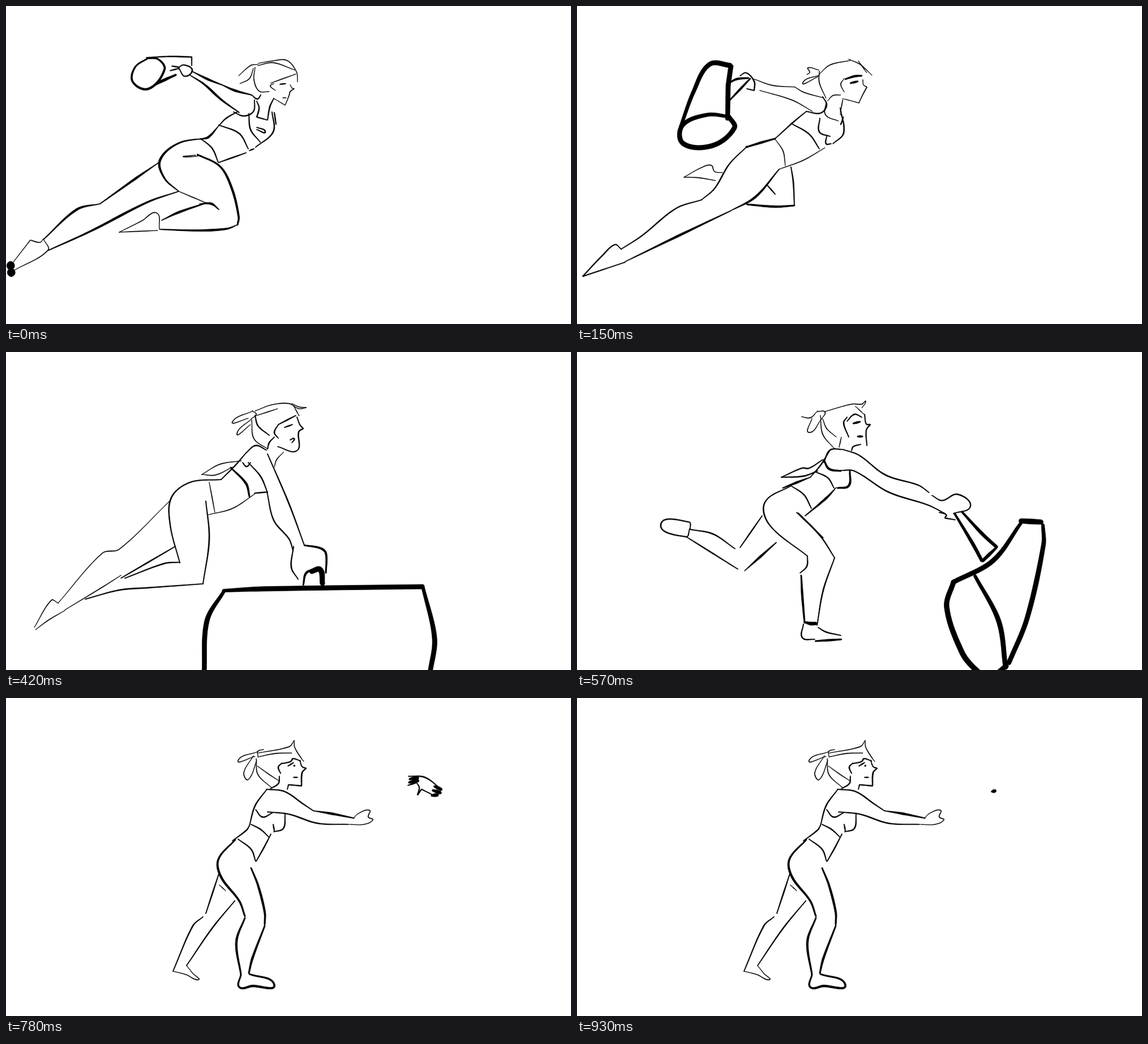
Write an HTML page that moves like this. It is 998x561 px and loops after 0.96 s.

```html
<!DOCTYPE html>
<html lang="en">
<head>
<meta charset="utf-8">
<title>Throw</title>
<style>
html, body { margin: 0; width: 100%; height: 100%; overflow: hidden; background: #fff; }
svg { display: block; width: 998px; height: 561px; }
path { fill: none; stroke: #000; stroke-width: 2; stroke-linejoin: round; stroke-linecap: round; }
path.ink { fill: #000; stroke-width: .7; }
g[id] { visibility: hidden; animation: 960ms step-end infinite; }
#lunge { animation-name: lunge; }
#windup { animation-name: windup; }
#swing { animation-name: swing; }
#plant { animation-name: plant; }
#release { animation-name: release; }
#follow { animation-name: follow; }
#mug { animation-name: mug; transform-origin: 305px 129px; }
#flung { animation-name: flung; transform-origin: 740px 430px; }
#burst { animation-name: burst; transform-origin: 736px 164px; }
#speck { animation-name: speck; }
@keyframes lunge { 0% { visibility: visible; } 12.5%, 100% { visibility: hidden; } }
@keyframes windup { 12.5% { visibility: visible; } 28.125%, 100% { visibility: hidden; } }
@keyframes swing { 28.125% { visibility: visible; } 43.75%, 100% { visibility: hidden; } }
@keyframes plant { 43.75% { visibility: visible; } 59.375%, 100% { visibility: hidden; } }
@keyframes release { 59.375% { visibility: visible; } 68.75%, 100% { visibility: hidden; } }
@keyframes follow { 68.75%, 100% { visibility: visible; } }
@keyframes mug {
  12.5% { visibility: visible; transform: rotate(26deg) scale(.85); }
  15.625% { visibility: visible; transform: none; }
  28.125%, 100% { visibility: hidden; }
}
@keyframes flung {
  59.375% { visibility: visible; transform: none; }
  68.75% { visibility: visible; transform: translateY(-130px) scale(.7); }
  78.125% { visibility: visible; transform: translateY(-255px) scale(.4); }
  81.25%, 100% { visibility: hidden; }
}
@keyframes burst {
  81.25% { visibility: visible; transform: none; }
  84.375% { visibility: visible; transform: scale(.8); }
  87.5% { visibility: visible; transform: scale(.6); }
  90.625% { visibility: visible; transform: scale(.45); }
  93.75% { visibility: visible; transform: scale(.3); }
  96.875%, 100% { visibility: hidden; }
}
@keyframes speck { 96.875%, 100% { visibility: visible; } }
</style>
</head>
<body>
<svg viewBox="0 0 998 561">
<g id="lunge">
  <path class="thin" d="M446 101 470 97 496 96 513 116 515 134M445 105 472 100 510 113M440 108 438 130 447 150 465 151M445 103 432 105 411 123M437 110 430 128 413 137"/>
  <path class="thin" d="M468 136 487 129 512 120M473 137 467 141 476 149M502 139L505 145L509 146 502 151 500 158L493 175 473 163M489 162 495 162"/>
  <path class="pen" d="M484 138 494 137M304 109 314 104 329 113 316 124 306 111M434 157 444 164 450 157M439 166 437 186 420 194 402 187"/>
  <path class="swell" d="M328 115 356 129 381 139M379 138 404 149 434 157M325 122 350 138 380 165 412 188"/>
  <path class="pen" d="M410 186 389 198 376 211M376 210 412 225 428 252M430 255 438 252M443 168 447 180L443 196L461 201M473 163 466 178 462 201"/>
  <path class="pen" d="M429 190 432 218 449 240M470 187 472 222 441 249M474 188 477 209M443 214 458 222L443 218M376 276 424 259M344 234 364 251 375 276"/>
  <path class="swell" d="M376 211 358 231 344 235M356 233 305 242 272 272 280 304 305 327M342 349 363 349 376 359M275 378 305 364 355 347"/>
  <path class="bold" d="M338 262 378 283 399 322 411 372 409 386"/>
  <path class="swell" d="M409 386 390 393 340 396 271 394M270 276 228 305 166 349M166 349 125 359 66 412M305 327 250 346 150 397 75 431"/>
  <path class="thin" d="M305 327 355 348M345 264 314 266 335 263M200 399 240 379 266 365 271 393M200 399 268 396M271 276 270 286"/>
  <path class="thin" d="M66 411 60 417L43 413 12 453M66 411 74 431 15 466"/>
  <path class="dot" d="M8 458 8.5 458M9 470 9.5 470"/>
  <path class="bold" d="M251 92 228 108 224 134 252 146 280 112 269 94 251 92"/>
  <path class="pen" d="M248 91 290 89L328 90L328 105M293 106 306 108M290 114 306 110"/>
  <path class="bold" d="M264 139 300 121M271 133 300 122"/>
</g>

<g id="windup">
  <path class="thin" d="M428 120 447 104 483 96M480 94 500 103 521 122M497 97 512 118M428 115 428 135 440 163M443 167 452 158 466 157M427 113 408 109 411 117 406 121M428 122 399 135 427 124"/>
  <path class="thin" d="M472 128 466 138 472 152M505 130 506 139L512 143 503 160L498 171 472 164"/>
  <path class="bold" d="M474 129 490 124 503 123M483 136 496 133"/>
  <path class="thin" d="M313 129 345 140 385 143M385 143 400 152 435 162M323 149 380 166 416 186"/>
  <path class="pen" d="M288 123 299 118 313 133L313 149 300 146M434 160 441 175 430 189 405 186"/>
  <path class="pen" d="M405 186 382 205 350 234M378 207 410 226 428 252M429 198 428 222 447 230M441 230 440 243 449 243M465 180 471 224 452 243"/>
  <path class="thin" d="M440 170 439 192 462 203M470 163 465 188M465 190 469 198 466 209 471 195M350 235 364 256 368 282M357 288 400 272 438 250"/>
  <path class="bold" d="M350 234 325 241 299 249M299 249 300 248"/>
  <path class="pen" d="M299 249 269 279 243 322 220 342M220 342 175 357 115 405 78 429M78 429 67 421 45 440L10 477L85 452"/>
  <path class="swell" d="M85 451 180 405 270 362M270 362 315 337 357 288"/>
  <path class="pen" d="M378 284 382 310 384 352M336 316 350 332"/>
  <path class="bold" d="M384 352 350 354 300 350"/>
  <path class="thin" d="M189 302 220 285 237 281 243 292 257 294M189 302 215 303 245 308"/>
</g>
<g id="mug">
  <path class="thick" d="M183 213 206 151 234 103L272 105L267 140 266 198M268 195 230 192 186 211 188 243 240 246 278 215 268 195"/>
  <path class="bold" d="M270 135 282 129 303 127M270 166 306 128"/>
</g>

<g id="swing">
  <path class="thin" d="M438 104 480 94 508 102 518 96M440 108 465 105 488 107M496 97 510 119M434 110 429 140 443 165M443 165 463 153 466 142M432 118 450 155M438 103 418 106 400 115M428 112 398 138 425 120M430 105 438 108 431 111"/>
  <path class="pen" d="M473 126 466 126 467 140 470 134M473 130 490 122 498 113M506 118 504 128L515 133 508 142L501 173 470 164M484 130 496 124M493 155 500 156"/>
  <path class="pen" d="M363 235 384 213 410 172 436 163M385 247 420 205 438 180 434 165M343 243 360 238 383 256 375 280"/>
  <path class="bold" d="M357 239 340 251 343 268"/>
  <path class="pen" d="M384 206 378 210 384 215M383 248 398 277M375 281 405 272 440 255M425 224 440 240 439 257M432 218 440 228M445 245 472 232 470 203"/>
  <path class="thin" d="M443 197 468 204M443 170 453 198M413 220 430 225M474 165 468 200"/>
  <path class="pen" d="M363 235 315 240 275 270M385 283 404 312 405 375M340 317 370 350M355 339 375 353M209 378 195 398L170 405 107 472M218 430 183 449 124 485"/>
  <path class="taper" d="M272 264 245 274 214 292L211 340 222 415 250 488"/>
  <path class="bold" d="M270 263 305 313 375 373M250 488 275 430 320 391 370 377"/>
  <path class="heavy" d="M365 376 400 378 410 410 375 465 315 510 262 510 250 488"/>
  <path class="bold" d="M303 311 330 283 357 260 363 262 344 293 330 334"/>
</g>

<g id="plant">
  <path class="thin" d="M440 104 470 93 500 91 517 100 531 98M505 91 518 97 530 98M508 95 518 113M443 112 480 100M434 120 438 153 462 171M436 104 400 123 428 117M434 118 408 144 432 128M435 104 442 110 433 118"/>
  <path class="pen" d="M462 171 465 160 474 150M440 112 445 130 465 147M481 128 474 142 481 152M481 128 512 112M514 115 519 128L525 135 517 141 514 174L480 167M492 133 506 128M502 155 509 153 505 160"/>
  <path class="pen" d="M461 247 473 297 500 330 507 350M462 180 500 268 527 341M508 343 504 380 516 401M424 178 441 165 460 173M418 195 425 202 432 195"/>
  <path class="bold" d="M527 341 555 346 565 355 565 390M397 204 424 232 430 255"/>
  <path class="thin" d="M346 216 378 198 416 192M346 216 370 217 400 203M490 177 478 190 474 203M359 230 369 283M358 287 400 276 440 250"/>
  <path class="pen" d="M428 195 450 220 462 248M439 249 462 247M424 178 405 200 380 225"/>
  <path class="pen" d="M380 225 325 230 292 257 290 305 307 372M353 263 359 330 348 409M348 409 250 416 200 420 140 436M299 343 203 399M307 371 280 373 210 399"/>
  <path class="thin" d="M288 264 200 348 170 355 92 443M203 394 170 415 104 455M92 443 80 438 50 486M104 456 75 473 52 490"/>
  <path class="thick" d="M384 421 450 418 735 414M385 422 355 474 350 566M736 413 757 505 749 566"/>
  <path class="fat" d="M540 387 555 384L559 408"/>
  <path class="bold" d="M525 411 531 389 551 384"/>
</g>

<g id="release">
  <path class="thin" d="M438 105 485 92 503 92 510 87 503 99M492 96 507 110M430 112 434 145 455 171M463 168 467 150M434 118 441 135 458 150M425 104 412 116 396 114M415 117 410 142 432 118M425 105 438 106 432 118"/>
  <path class="pen" d="M477 115 471 125 480 150M477 122 490 110 503 115M508 110 511 127L518 128 511 138L512 165M501 163 488 167 485 174"/>
  <path class="bold" d="M488 126 500 123M496 149 504 149M436 190 445 206 466 210M482 210 480 236 460 240"/>
  <path class="pen" d="M470 172 498 182 545 217 603 235 622 248M465 209 490 210 550 247 620 270 650 285M627 253 645 262 672 251 695 272 665 285M640 283 652 287L650 293L668 296"/>
  <path class="pen" d="M436 195 447 173 470 172M361 221 397 205 410 205 434 190M361 221 400 219 425 210M447 173 430 200 412 221M420 211 443 222 454 240M378 236 401 252 414 276"/>
  <path class="swell" d="M412 221 363 240M458 239 440 258 403 289M296 386 352 336"/>
  <path class="pen" d="M378 236 332 265 340 305 407 360M388 283 430 325 455 363M391 284 435 328M455 363 435 420 424 482M407 360 406 378 394 390"/>
  <path class="bold" d="M396 394 398 430 402 478M421 510 467 507"/>
  <path class="heavy" d="M404 477 412 479 422 479"/>
  <path class="pen" d="M400 480 398 504L420 507M426 486 440 494 466 500M327 289 288 345M279 347 240 321 200 313M284 383 225 346 193 326M200 313 198 300 148 304 193 326 199 312"/>
</g>
<g id="flung">
  <path class="fat" d="M784 298 820 300M665 406 653 450 680 530 705 561 728 574 758 554"/>
  <path class="thick" d="M823 305 824 340 795 470 763 548M784 302 735 368 665 406M703 395 745 475 757 556"/>
  <path class="heavy" d="M667 285 700 340 715 368M680 282 715 320 741 344M741 345 717 368"/>
</g>

<g id="follow">
  <path class="thin" d="M446 97 500 86 509 75M509 75 510 87 522 107 526 112M445 104 475 98 505 97M442 107 445 135 470 159M444 120 465 135 482 146M444 95 410 110 440 103M437 102 420 132 428 144 443 110M455 91 445 94 445 103"/>
  <path class="pen" d="M486 116 503 112 507 107 520 111M487 115 481 122 485 133M483 138 481 151 467 160M519 110 523 121L530 124 523 132L522 155L499 153L497 161M498 120 508 114M508 140 515 140"/>
  <path class="bold" d="M509 119 509.5 120"/>
  <path class="pen" d="M460 161 492 165 525 187 543 199M462 201 500 205 550 221 605 223M460 162 440 190 430 225M441 197 453 210 470 203"/>
  <path class="swell" d="M543 199 575 204 615 212"/>
  <path class="thin" d="M614 212 622 204 642 198 640 210 648 215 632 223 607 223"/>
  <path class="pen" d="M493 205 490 230 473 236M472 223 474 235M433 223 450 232 464 245M468 240 455 265 442 288M430 225 425 233 400 252M410 249 433 267 441 288"/>
  <path class="bold" d="M405 250 375 285 380 316 412 358 422 385M422 388 407 430 415 488M433 300 445 330 457 378 457 400M457 402 435 460 429 485"/>
  <path class="bold" d="M415 488 412 510L435 508 474 506L430 487"/>
  <path class="pen" d="M376 310 353 380M348 386 330 402 295 482M404 358 365 405 319 472"/>
  <path class="thin" d="M295 482 318 488 340 497L330 486 319 472M377 330 388 340"/>
</g>
<g id="burst">
  <path class="pen" d="M711 138 740 140 770 162M710 154 724 150M725 149 730 158L727 171L734 161L752 170"/>
  <path class="heavy" d="M713 143 727 141M712 149 727 146M757 156 768 161M754 163 767 167M752 172 762 171"/>
</g>
<g id="speck"><path class="heavy" d="M733 165 738 164"/></g>
</svg>
<script>
// Pen widths along a stroke, from start to end.
const pens = {
  thin: [1.2, 1.9, 1.2], pen: [1.9, 2.7, 1.9], swell: [1.6, 4.5, 2], bold: [2.8, 4.4, 3],
  heavy: [4, 6.5, 6], taper: [8, 9, 7, 3], thick: [6, 9, 8.5], fat: [9, 10, 9], dot: [16, 16]
};

function unit(a, b) {
  const d = Math.hypot(b.x - a.x, b.y - a.y) || 1;
  return { x: (b.x - a.x) / d, y: (b.y - a.y) / d };
}

function widthAt(w, t) {
  const s = t * (w.length - 1), i = Math.min(Math.floor(s), w.length - 2);
  return w[i] + (w[i + 1] - w[i]) * (s - i);
}

// An explicit L marks a sharp corner; the other points are joined smoothly.
function parse(text) {
  return [...text.matchAll(/(L?)\s*([\d.]+) ([\d.]+)/g)]
    .map(([, l, x, y]) => ({ x: +x, y: +y, sharp: l === "L" }));
}

// Outline of a smooth stroke with changing width.
function outline(text, widths) {
  const pts = parse(text), last = pts.length - 1, left = [], right = [], N = 10;
  const heading = (i, a, b) =>
    i === 0 || i === last || pts[i].sharp ? unit(a, b) : unit(pts[i - 1], pts[i + 1]);
  for (let i = 0; i < last; i++) {
    const a = pts[i], b = pts[i + 1], reach = Math.hypot(b.x - a.x, b.y - a.y);
    const u = heading(i, a, b), v = heading(i + 1, a, b);
    for (let n = 0; n <= N; n++) {
      const t = n / N, r = 1 - t;
      const at = k => r * r * (1 + 2 * t) * a[k] + t * t * (3 - 2 * t) * b[k] +
        reach * t * r * (r * u[k] - t * v[k]);
      const slope = k => 6 * t * r * (b[k] - a[k]) +
        reach * (r * (1 - 3 * t) * u[k] + t * (3 * t - 2) * v[k]);
      const dx = slope("x"), dy = slope("y");
      const h = (widthAt(widths, (i + t) / last) - .7) / 2 / (Math.hypot(dx, dy) || 1);
      const x = at("x"), y = at("y");
      left.push([x - dy * h, y + dx * h]);
      right.unshift([x + dy * h, y - dx * h]);
    }
  }
  // Round caps
  const w = [widths[0], widths.at(-1)].map(k => Math.max(k - .7, .1) / 2);
  const line = side => side.map(p => p.map(k => k.toFixed(1)).join(" ")).join("L");
  const arc = (k, p) => `A${k} ${k} 0 0 0 ${p[0].toFixed(1)} ${p[1].toFixed(1)}`;
  return "M" + line(left) + arc(w[1], right[0]) + "L" + line(right) + arc(w[0], left[0]) + "Z";
}

for (const path of document.querySelectorAll("path")) {
  const strokes = path.getAttribute("d").split("M").slice(1);
  path.setAttribute("d", strokes.map(s => outline(s, pens[path.className.baseVal])).join(""));
  path.setAttribute("class", "ink");
}
</script>
</body>
</html>
```
